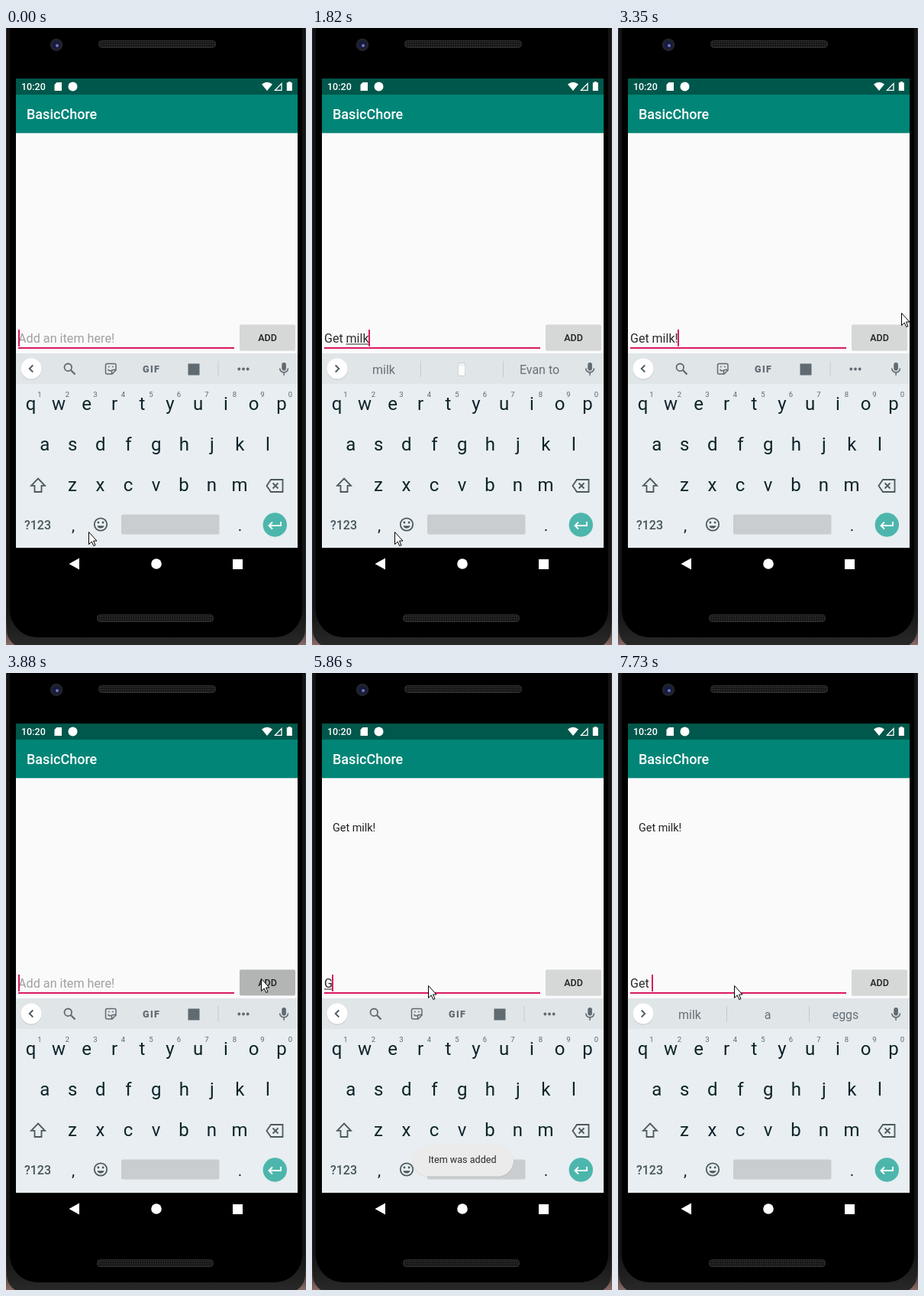
An HTML page that plays this animation: 393 px wide and 806 px high, repeating every 8 s.

```html
<!DOCTYPE html>
<html lang="en">
<head>
<meta charset="utf-8">
<title>To-do list demo</title>
<style>
  html, body { margin: 0; width: 100%; height: 100%; overflow: hidden; background: #000; }
  svg { display: block; width: 393px; height: 806px; }
  text { font-family: Roboto, "Liberation Sans", sans-serif; white-space: pre; }
  .mid { text-anchor: middle; }
  .key { font-size: 24px; fill: #0d242b; }
  .dot { font-size: 21px; fill: #0d242b; }
  .num { font-size: 9.5px; fill: #5c686e; }
  .word { font-size: 16px; fill: #657178; }
  .line { fill: none; stroke: #4b595f; stroke-width: 1.8; }
  .tool { fill: none; stroke: #5f6b71; stroke-width: 1.8; }
  .solid { fill: #5f6b71; stroke: none; }
</style>
</head>
<body>
<svg viewBox="0 0 393 806">
  <defs>
    <linearGradient id="desk" x1="0" y1="0" x2="0" y2="1">
      <stop offset=".96" stop-color="#2b2929"/><stop offset="1" stop-color="#8a6a66"/>
    </linearGradient>
    <linearGradient id="rim" x1="0" y1="0" x2="0" y2="1">
      <stop offset=".94" stop-color="#131313"/><stop offset="1" stop-color="#2a2a2a"/>
    </linearGradient>
    <pattern id="mesh" width="3" height="3" patternUnits="userSpaceOnUse">
      <rect width="3" height="3" fill="#161616"/>
      <rect width="1.5" height="1.5" fill="#333"/>
    </pattern>
  </defs>

  <!-- phone body -->
  <rect width="393" height="806" fill="url(#desk)"/>
  <rect x="1" y="-90" width="391" height="900" rx="24" fill="url(#rim)"/>
  <rect x="5" y="-90" width="383" height="886" rx="36" fill="#000"/>
  <circle cx="66" cy="22" r="8.3" fill="#20232b"/>
  <circle cx="66" cy="22" r="5" fill="#171a40"/>
  <circle cx="67" cy="23" r="2" fill="#6f78bd"/>
  <rect x="121.5" y="16.5" width="153" height="9" rx="4" fill="url(#mesh)" stroke="#303030"/>
  <rect x="119.5" y="766.5" width="152" height="9" rx="4" fill="url(#mesh)" stroke="#303030"/>

  <!-- app -->
  <rect x="13" y="66" width="369" height="359" fill="#fafafa"/>
  <rect x="13" y="66" width="369" height="21" fill="#00574b"/>
  <rect x="13" y="87" width="369" height="50.3" fill="#008577"/>
  <text x="20" y="81.3" font-size="12.5" font-weight="500" fill="#fff">10:20</text>
  <g fill="#fff">
    <path d="M66.5 71H73V82H63.5V74Z"/>
    <circle cx="87.5" cy="76.5" r="6"/>
    <path d="M335 73.5Q342 68 349 73.5L342 82Z"/>
    <path d="M361 72.6V81.3H352.5Z" fill="none" stroke="#fff" stroke-width="1.3"/>
    <path d="M369.8 70h3v1.3h2V82h-7V71.3h2Z"/>
  </g>
  <text x="27" y="119.3" font-size="18" font-weight="500" fill="#fff">BasicChore</text>
  <text id="item" x="27" y="207.3" font-size="14.4" fill="#212121">Get milk!</text>

  <text id="hint" x="16" y="411" font-size="16.2" fill="#a0a0a0">Add an item here!</text>
  <text id="entry" x="16" y="411" font-size="16" fill="#2a2a2a"></text>
  <rect id="under" y="412.5" height="1" fill="#2a2a2a"/>
  <rect x="16" y="417" width="283" height="2" fill="#d81b60"/>
  <rect id="caret" y="394" width="2" height="22" fill="#d81b60"/>
  <rect x="306" y="388.5" width="73" height="33.5" rx="2" opacity=".1"/>
  <rect id="button" x="306" y="387.5" width="73" height="33.5" rx="2"/>
  <text class="mid" x="342.5" y="409" font-size="12.5" font-weight="500" fill="#212121">ADD</text>

  <!-- keyboard -->
  <rect x="13" y="425" width="369" height="254" fill="#e8eef1"/>
  <rect x="13" y="425" width="369" height="40" fill="#e0e5e8"/>
  <circle cx="33" cy="446" r="13.7" fill="#c9cfd2"/>
  <circle cx="33" cy="445" r="13.5" fill="#fff"/>
  <path id="chevron" class="line" d="M2.3 -4.5L-2.3 0L2.3 4.5"/>

  <g id="tools" class="tool">
    <circle cx="81.3" cy="443.3" r="4.8"/>
    <path d="M84.8 446.8L90.5 452.5" stroke-width="2.3"/>
    <path d="M132.5 438.5H142Q144 438.5 144 440.5V447L139 452H132.5Q130.5 452 130.5 450V440.5Q130.5 438.5 132.5 438.5ZM144 446.5H140.5Q138.5 446.5 138.5 448.5V452" stroke-width="1.5"/>
    <path d="M133.5 446Q135.5 449 138.5 447M134 442.5h1.7M139 442.5h1.7" stroke-width="1.5"/>
    <text class="solid" x="179" y="449.5" font-size="12.5" font-weight="900" letter-spacing="1.4">GIF</text>
    <rect class="solid" x="238.5" y="438.5" width="15" height="15"/>
    <path d="M278 435V455" stroke="#c4cbcf" stroke-width="1"/>
    <g class="solid"><circle cx="305.3" cy="445.5" r="1.9"/><circle cx="311" cy="445.5" r="1.9"/><circle cx="316.7" cy="445.5" r="1.9"/></g>
  </g>
  <g id="words">
    <path d="M142.5 435V456M250.5 435V456" stroke="#c4cbcf"/>
    <text class="word mid" x="94" y="451.5"></text>
    <text class="word mid" x="196" y="451.5"></text>
    <text class="word mid" x="298" y="451.5"></text>
    <g id="glass" stroke="#cdd3d6">
      <path d="M191.5 437.5H200.5L200 454.5H192Z" fill="#f0f2f3"/>
      <path d="M192 441.5H200.2L199.8 453.5H192.3Z" fill="#fcfcfc" stroke="none"/>
    </g>
  </g>
  <g class="tool">
    <rect class="solid" x="361.3" y="437" width="5.6" height="10.5" rx="2.8"/>
    <path d="M358.7 444.5a5.4 5.4 0 0 0 10.8 0M364.1 450V453.8" stroke-width="1.6"/>
  </g>

  <g id="keys"></g>
  <path id="shift" class="line" d="M42 588.5L51 597.8H46.5V606H37.5V597.8H33Z"/>
  <path class="line" d="M347 590H362.5V606H347L341.5 598ZM349.5 594.5L356.5 601.5M356.5 594.5L349.5 601.5"/>
  <text class="mid" x="41.5" y="654.5" font-size="16" fill="#46555b" font-weight="500">?123</text>
  <text class="mid dot" x="88" y="657">,</text>
  <text class="mid dot" x="306.5" y="657">.</text>
  <circle class="line" cx="124" cy="648.5" r="8.2"/>
  <g fill="#4b595f">
    <circle cx="120.9" cy="646" r="1.4"/>
    <circle cx="127.1" cy="646" r="1.4"/>
    <path d="M119.4 650.3H128.6Q127.400 653.500 124 653.500Q120.600 653.500 119.400 650.300Z"/>
  </g>
  <rect x="151" y="635.5" width="128.500" height="26" rx="2.5" fill="#c9cdd0"/>
  <circle cx="352.3" cy="649" r="15.7" fill="#4db6ac"/>
  <path d="M360 645V650H345M349 645.5L344.5 650L349 654.5" fill="none" stroke="#fff" stroke-width="1.8"/>

  <g id="toast">
    <rect x="131.5" y="617" width="133" height="41.5" rx="20.7" opacity=".06"/>
    <rect x="132" y="616" width="132" height="41.5" rx="20.7" fill="#ebebeb"/>
    <text class="mid" x="197" y="640.3" font-size="12.6" fill="#2b2b2b">Item was added</text>
  </g>

  <!-- navigation -->
  <rect x="13" y="679" width="369" height="42" fill="#000"/>
  <g fill="#fff">
    <path d="M82.5 700L96 692.5V707.5Z"/>
    <circle cx="197" cy="700" r="6.8"/>
    <rect x="297" y="694" width="13" height="13"/>
  </g>

  <path id="mouse" d="M.5 .5V16.5L4.200 13L6.800 18.500L9 17.500L6.500 12H11Z" fill="#fff" stroke="#000"/>
</svg>
<script>
const LOOP = 8000;
const $ = id => document.getElementById(id);
const FOR_GE = ['Ge', 'Get', 'Getting'];
const FOR_GET = ['milk', 'a', 'eggs'];

// Each step: time in ms, then what changes from there on.
const steps = [
  [0, { text: '', caret: 1, words: null, mouse: [108, 658], upper: false, press: 0, item: 0, toast: 0 }],
  [270, { upper: true }],
  [390, { upper: false, text: 'G' }],
  [670, { text: 'Ge' }],
  [790, { text: 'Get', words: FOR_GE }],
  [940, { text: 'Get ' }],
  [1060, { words: FOR_GET }],
  [1180, { text: 'Get m' }],
  [1300, { words: ['milk', 'my', 'money'] }],
  [1580, { text: 'Get mi' }],
  [1700, { text: 'Get mil', words: ['mi', 'milk', 'mind'] }],
  [1820, { text: 'Get milk', words: ['milk', '', 'Evan to'] }],
  [2120, { text: 'Get milk!' }],
  [2240, { words: null }],
  [2670, { caret: 0 }],
  [2950, { mouse: [355, 464] }],
  [3100, { mouse: [371, 222] }],
  [3225, { mouse: [371, 310], caret: 1 }],
  [3350, { mouse: [371, 372] }],
  [3490, { mouse: [352, 388] }],
  [3610, { mouse: [338, 398] }],
  [3730, { mouse: [334, 399], caret: 0 }],
  [3880, { text: '', caret: 1, press: 1 }],
  [4000, { item: .5, toast: .3, press: .6 }],
  [4150, { item: 1, toast: .7, press: 0, mouse: [325, 407] }],
  [4270, { toast: 1, mouse: [268, 438] }],
  [4390, { caret: 0, mouse: [213, 451] }],
  [4540, { mouse: [181, 427] }],
  [4660, { mouse: [162, 413] }],
  [4810, { mouse: [157, 409] }],
  [4960, { mouse: [152, 408], caret: 1 }],
  [5330, { caret: 0 }],
  [5860, { text: 'G', caret: 1 }],
  [6010, { text: 'Ge', toast: .65 }],
  [6130, { words: FOR_GE, toast: .3 }],
  [6250, { text: 'Get', toast: 0 }],
  [6770, { caret: 0 }],
  [7170, { caret: 1 }],
  [7730, { text: 'Get ', words: FOR_GET }]
];

const svgNS = 'http://www.w3.org/2000/svg';
function addText(cls, x, y, label) {
  const el = document.createElementNS(svgNS, 'text');
  el.setAttribute('class', cls);
  el.setAttribute('x', x);
  el.setAttribute('y', y);
  el.textContent = label;
  $('keys').append(el);
  return el;
}

const letters = [];
[['qwertyuiop', 32.5, 499], ['asdfghjkl', 50.8, 552], ['zxcvbnm', 87, 605]].forEach(([row, x0, y], r) => {
  [...row].forEach((ch, i) => {
    const x = x0 + i * 36.5;
    letters.push(addText('key mid', x, y, ch));
    if (r === 0) addText('num mid', x + 11.3, 481.5, (i + 1) % 10);
  });
});

const pen = document.createElement('canvas').getContext('2d');
function widthOf(s) {
  pen.font = '16px Roboto, "Liberation Sans", sans-serif';
  return pen.measureText(s).width;
}

const show = (id, alpha) => $(id).setAttribute('opacity', +alpha);
const place = (id, attrs) => {
  for (const k in attrs) $(id).setAttribute(k, attrs[k]);
};
const slots = [...$('words').querySelectorAll('text')];

function draw(s) {
  const { text, words } = s;
  $('entry').textContent = text;
  show('hint', text === '');
  place('caret', { x: Math.max(16, Math.round(15.2 + widthOf(text))), opacity: s.caret });

  // The word being typed is underlined.
  const word = (text.match(/\w+$/) || [''])[0];
  const start = widthOf(text.slice(0, text.length - word.length));
  place('under', { x: 16 + start, width: widthOf(text) - start });

  show('tools', !words);
  show('words', !!words);
  place('chevron', { transform: `translate(33 445) scale(${words ? -1 : 1} 1)` });
  slots.forEach((el, i) => el.textContent = words ? words[i] : '');
  const strong = words === FOR_GE;
  slots[1].style.fontWeight = strong ? 700 : 400;
  slots[1].style.fill = strong ? '#0d1519' : '';
  show('glass', !!words && words[1] === '');

  letters.forEach(el => {
    el.textContent = s.upper ? el.textContent.toUpperCase() : el.textContent.toLowerCase();
  });
  $('shift').style.fill = s.upper ? '#4b595f' : 'none';

  const grey = Math.round(214 - 35 * s.press);
  place('button', { fill: `rgb(${grey},${grey + 1},${grey + 1})` });
  show('item', s.item);
  show('toast', s.toast);
  place('mouse', { transform: `translate(${s.mouse})` });
}

const begin = performance.now();
let last = -1;
function tick() {
  const t = (performance.now() - begin) % LOOP;
  const past = steps.filter(([at]) => at <= t);
  if (past.length !== last) {
    last = past.length;
    draw(Object.assign({}, ...past.map(step => step[1])));
  }
  requestAnimationFrame(tick);
}
tick();
</script>
</body>
</html>
```
